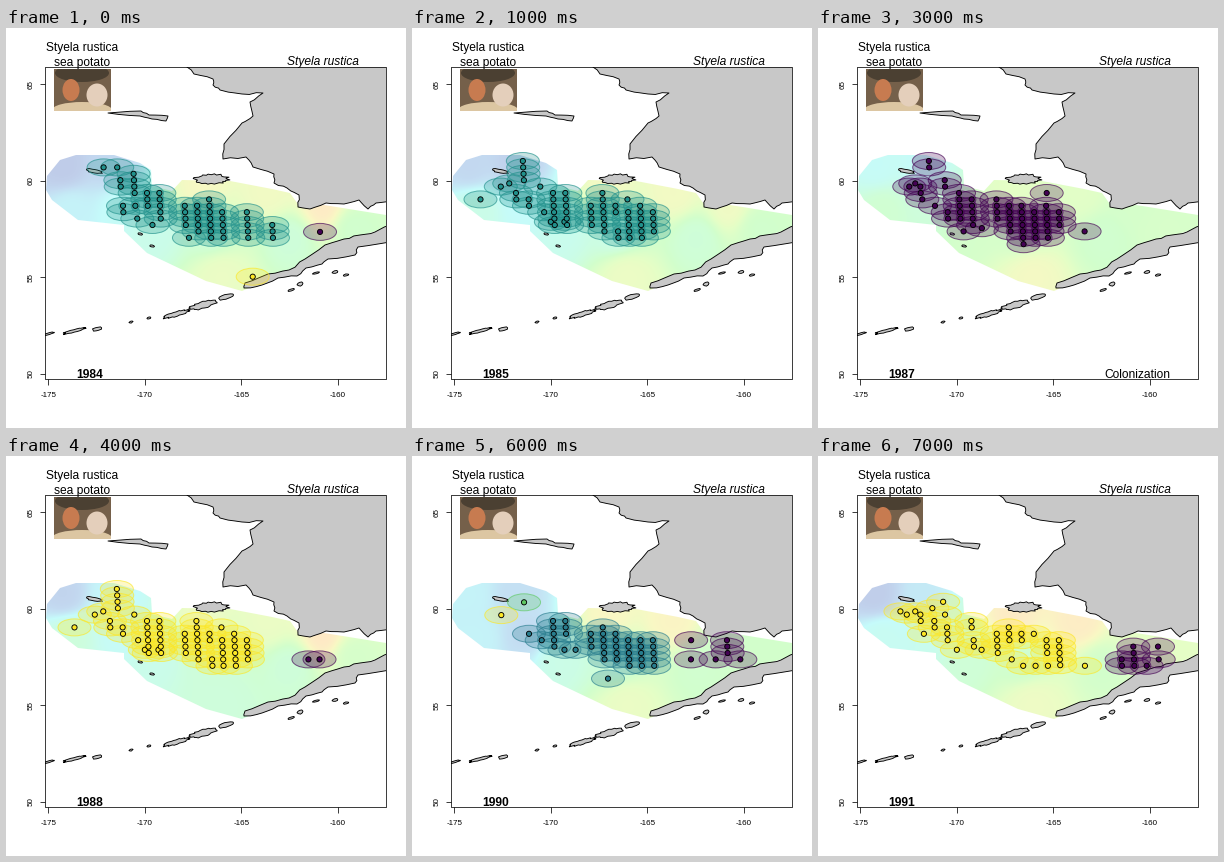
A matplotlib script that plays this animation: 400x400 px, repeating every 8000 ms.

```python
import numpy as np
import matplotlib.pyplot as plt
from matplotlib.animation import FuncAnimation
from matplotlib.collections import PatchCollection
from matplotlib.colors import LinearSegmentedColormap
from matplotlib.patches import Circle, Ellipse, Polygon, Rectangle

PX = 0.72  # points per pixel at 100 dpi
LEFT, TOP, RIGHT, BOTTOM = 39, 39, 380, 351
VIRIDIS = plt.get_cmap("viridis")
PASTEL = LinearSegmentedColormap.from_list("pastel", [
    "#bec7e6", "#c4dcf2", "#c6fbfb", "#ccfde4", "#d2ffcc",
    "#e6fec6", "#f9f8c4", "#ffe8c6", "#ffdccb"])
rng = np.random.default_rng(4)

MAINLAND = [
    (177, 36), (188, 46), (207, 51), (207, 57), (214, 62), (236, 66),
    (257, 65), (244, 74), (247, 88), (236, 95), (218, 116), (217, 131),
    (240, 129), (247, 139), (268, 146), (268, 155), (281, 160), (293, 167),
    (292, 179), (304, 181), (320, 175), (338, 176), (353, 172), (362, 181),
    (370, 175), (384, 173), (384, 36)]
PENINSULA = [
    (384, 197), (369, 204), (354, 207), (338, 211), (319, 217), (299, 231),
    (283, 242), (262, 246), (239, 255), (238, 260), (256, 257), (272, 250),
    (291, 248), (300, 240), (316, 236), (322, 231), (349, 227), (352, 219),
    (384, 214)]
LAWRENCE = [(102, 85), (135, 83), (143, 87), (162, 88), (160, 93), (146, 91),
            (134, 88)]
# Small islands: centre and size
ISLANDS = [
    (206, 151, 35, 10), (88, 143, 17, 4), (134, 206, 5, 2), (146, 218, 5, 2),
    (220, 269, 15, 5), (197, 277, 29, 7), (170, 286, 29, 5), (143, 290, 4, 2),
    (125, 294, 4, 2), (91, 301, 10, 4), (68, 303, 24, 3), (42, 306, 14, 2),
    (285, 262, 8, 2), (294, 256, 6, 4), (310, 245, 7, 2), (329, 244, 6, 3),
    (340, 247, 6, 2)]
SHELF = [
    (40, 162), (41, 148), (54, 132), (70, 127), (108, 127), (134, 135),
    (145, 142), (146, 158), (166, 163), (176, 152), (224, 153), (266, 161),
    (284, 165), (294, 179), (318, 177), (380, 187), (380, 200), (318, 219),
    (290, 239), (236, 263), (200, 253), (160, 234), (141, 225), (118, 203),
    (118, 197), (72, 192), (46, 172)]

# Temperature anchors, and their values (percent of the scale) by season
ANCHORS = [(58, 140), (105, 140), (65, 180), (115, 178), (150, 200), (195, 160),
           (262, 167), (205, 205), (215, 246), (285, 208), (318, 181), (345, 198)]
HEAT_84 = np.array([3, 10, 22, 27, 34, 74, 70, 42, 66, 42, 86, 48])
HEAT_86 = np.array([18, 2, 50, 24, 30, 70, 72, 27, 68, 44, 54, 50])
HEAT_87 = np.array([27, 26, 47, 42, 52, 62, 60, 50, 72, 48, 52, 54])
HEAT_88 = np.array([8, 23, 42, 27, 34, 68, 66, 42, 42, 42, 88, 52])
HEAT_90 = np.array([22, 14, 22, 12, 36, 76, 78, 40, 66, 48, 50, 50])
HEAT_91 = np.array([4, 18, 30, 32, 44, 85, 84, 46, 68, 50, 62, 62])

# Survey grid runs: column, first row, count (one when left out)
TEAL_84 = [(-3.4, 1), (-2.3, 1), (-2.1, 3, 2), (-1, 2, 4), (-2, 7, 2), (-1, 7),
           (-.9, 9), (.3, 10), (0, 5, 3), (1, 5, 5), (3, 7, 4), (3.2, 12),
           (4, 7, 5), (5, 6, 7), (6, 8, 5), (8, 8, 5), (10, 10, 3)]
DARK_87 = [(-2.3, 0, 2), (-1.1, 3, 2), (-4, 4), (-3.5, 3.5), (-3.1, 4, 2),
           (-3, 6), (-2, 7), (0, 5, 5), (1, 6, 5), (-1, 8, 2), (.2, 11),
           (1.7, 10.5), (3, 6, 4), (4, 7, 5), (5, 7, 7), (6, 8, 5),
           (7, 7, 6), (8, 8, 3), (7.1, 5), (10, 11)]
GOLD_88 = [(-2.3, 0, 4), (-1, 4), (-4.2, 4), (-3.5, 3.5), (-5.9, 6), (-3, 5, 2),
           (-2, 6, 2), (-.8, 8), (-.3, 9.5), (.8, 9.5), (0, 5, 6), (1, 5, 6),
           (3, 7, 4), (4, 5, 7), (5, 7, 2), (5.1, 11, 2), (6, 6), (6, 8, 5),
           (7, 7, 6), (8, 8, 4)]
TEAL_90 = [(-2, 7), (-1, 8), (0, 5, 5), (1, 5, 3), (.8, 9.5), (1.7, 9.5),
           (3, 7, 3), (4, 6, 6), (5, 7, 5), (6, 8, 5), (7, 8, 5), (8, 8, 5),
           (4.2, 14)]
DARK_90 = [(11.1, 8), (11, 11), (13, 11), (14, 8, 3), (15, 11)]
GOLD_91 = [(-4.7, 3.5), (-4.2, 4), (-3.5, 3.5), (-3.1, 4, 2), (-2.1, 3),
           (-1.2, 2), (-1.1, 4), (-2, 5, 2), (-1, 6, 3), (-2.9, 7), (-.3, 9.5),
           (1, 5, 2), (1.1, 8, 2), (1.7, 9.5), (4, 6, 3), (3, 7, 4), (5, 7, 2),
           (6, 7), (7, 8, 3), (8, 8, 4), (4.1, 11), (8, 11.9), (5, 12),
           (6, 12), (7, 12), (10, 12)]
DARK_91 = [(14, 9, 4), (13, 11, 2), (15, 12), (16, 9), (16, 11)]

# Each season: temperature, {viridis level: stations}, note
SEASONS = [
    (HEAT_84, {.5: TEAL_84, 0: [(13.8, 11)], 1: [(8.15, 18)]}, ""),
    ((HEAT_84 + HEAT_86) / 2, {.5: GOLD_88}, ""),
    (HEAT_86, {}, ""),
    (HEAT_87, {0: DARK_87}, "Colonization"),
    (HEAT_88, {1: GOLD_88, 0: [(12.9, 11), (13.8, 11)]}, ""),
    ((HEAT_88 + HEAT_90) / 2, {1: TEAL_90, 0: DARK_90}, ""),
    (HEAT_90, {.42: TEAL_90, .75: [(-2.3, 2)], 1: [(-4.2, 4)], 0: DARK_90}, ""),
    (HEAT_91, {1: GOLD_91, 0: DARK_91}, ""),
]


def heat_image(values):
    """Blend the anchors smoothly over the plot area."""
    x, y = np.meshgrid(np.arange(LEFT, RIGHT) + .5, np.arange(TOP, BOTTOM) + .5)
    total = np.zeros_like(x)
    weight = np.zeros_like(x)
    for (px, py), value in zip(ANCHORS, values):
        w = ((x - px) ** 2 + (y - py) ** 2 + 200) ** -2.0
        total += w * value / 100
        weight += w
    return PASTEL(total / weight)


def station_run(column, row, count=1):
    rows = row + np.arange(count)
    return [(141 + 12.35 * column + .35 * (r - 5), 133 + 6.4 * r) for r in rows]


def rough(points, parts=3, amount=.9):
    """Turn straight coast segments into an uneven shore."""
    shore = []
    for a, b in zip(points, points[1:] + points[:1]):
        a, b = np.array(a, float), np.array(b, float)
        shore.append(a)
        for t in np.arange(1, parts) / parts:
            shore.append(a + (b - a) * t + rng.uniform(-amount, amount, 2))
    return shore


def island(x, y, w, h):
    tilt = np.radians(-15 if y > 220 else 10 if w < 20 else 0)
    a = np.linspace(0, 2 * np.pi, max(8, w), endpoint=False)
    size = rng.uniform(.75, 1.1, a.size) / 2
    u, v = w * size * np.cos(a), h * size * np.sin(a)
    return np.column_stack([x + u * np.cos(tilt) - v * np.sin(tilt),
                            y + u * np.sin(tilt) + v * np.cos(tilt)])


def label(x, y, text, size=12, **style):
    style = {"ha": "center", "va": "baseline", **style}
    return ax.text(x, y, text, fontsize=size * PX, family="Liberation Sans",
                   zorder=9, **style)


def line(xs, ys):
    ax.plot(xs, ys, color="black", lw=.75 * PX, zorder=7,
            solid_capstyle="butt")


def draw_photo():
    photo = Rectangle((48, 41), 56.5, 42, fc="#75604a", ec="none", zorder=6)
    ax.add_patch(photo)
    blobs = [("#4b4032", 76, 45, 54, 18), ("#dcc6a2", 76, 82, 60, 16),
             ("#c77b50", 65, 62, 17, 22), ("#e4cfbb", 91, 67, 21, 23)]
    for color, x, y, w, h in blobs:
        blob = Ellipse((x, y), w, h, fc=color, ec="none", zorder=6)
        ax.add_patch(blob)
        blob.set_clip_path(photo)


def draw_map():
    shores = [rough(MAINLAND), rough(PENINSULA), rough(LAWRENCE, 3, .5)]
    for shore in shores + [island(*spot) for spot in ISLANDS]:
        patch = Polygon(shore, fc="#c8c8c8", ec="black", lw=.9 * PX,
                        joinstyle="round", zorder=3)
        ax.add_patch(patch)
        patch.set_clip_path(border)
    line([LEFT, RIGHT, RIGHT, LEFT, LEFT], [TOP, TOP, BOTTOM, BOTTOM, TOP])
    for i in range(4):
        x, y = 42.3 + 96.5 * i, 345.5 - 96.4 * i
        line([x, x], [BOTTOM, BOTTOM + 5.5])
        line([LEFT - 5.5, LEFT], [y, y])
        label(x, 369, f"{5 * i - 175}", 8)
        label(25, y, f"{50 + 5 * i}", 8, rotation=90, va="center")
    label(76, 23, "Styela rustica")
    label(76, 38, "sea potato")
    label(317, 37, "Styela rustica", style="italic")


fig = plt.figure(figsize=(4, 4), dpi=100, facecolor="white")
ax = fig.add_axes([0, 0, 1, 1])
border = Rectangle((LEFT, TOP), RIGHT - LEFT, BOTTOM - TOP, fc="none", ec="none")
ax.add_patch(border)
shelf = Polygon(SHELF, fc="none", ec="none")
ax.add_patch(shelf)
heat = ax.imshow(heat_image(HEAT_84), extent=(LEFT, RIGHT, BOTTOM, TOP), zorder=1)
heat.set_clip_path(shelf)
draw_map()
draw_photo()
year = label(84, 350, "", weight="bold")
note = label(319.5, 350, "")
ax.set(xlim=(0, 400), ylim=(400, 0), aspect="auto")
ax.axis("off")
marks = []


def draw(i):
    while marks:
        marks.pop().remove()
    values, groups, text = SEASONS[i]
    heat.set_data(heat_image(values))
    year.set_text(str(1984 + i))
    note.set_text(text)
    for level, runs in groups.items():
        color = VIRIDIS(float(level))[:3]
        spots = [spot for run in runs for spot in station_run(*run)]
        ranges = [Ellipse(spot, 33, 17) for spot in spots]
        dots = [Circle(spot, 2.6) for spot in spots]
        marks.append(ax.add_collection(PatchCollection(
            ranges, fc=(*color, .25), ec=(*color, .65), lw=PX, zorder=4)))
        marks.append(ax.add_collection(PatchCollection(
            dots, fc=color, ec="black", lw=.9 * PX, zorder=5)))
    return [heat, year, note, *marks]


anim = FuncAnimation(fig, draw, frames=len(SEASONS), interval=1000,
                     repeat=True, repeat_delay=0, blit=False)
plt.show()
```
